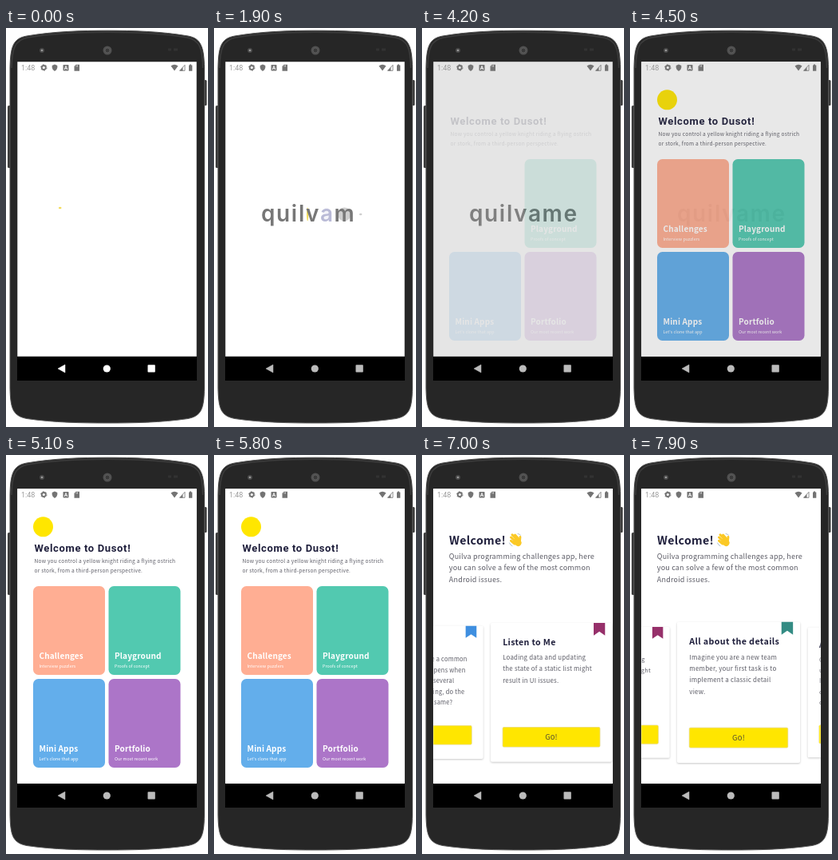
These frames come from a looping animation (253x499 px, 8 s). An HTML page:

```html
<!DOCTYPE html>
<html lang="en">
<head>
<meta charset="utf-8">
<title>App demo</title>
<style>
html, body { margin: 0; width: 100%; height: 100%; overflow: hidden; background: #fff; }
svg { display: block; width: 100%; height: 100%; }
text { font-family: 'Noto Sans CJK JP', 'Noto Sans CJK SC', 'Noto Sans CJK', 'Noto Sans', sans-serif; }
.rob { font-family: Roboto, sans-serif; }
.logo { font: 600 28px Inter, sans-serif; text-anchor: middle; }
.card { filter: drop-shadow(0 1px 1.2px rgba(0,0,0,.22)); }
.btn { filter: drop-shadow(0 .6px .8px rgba(0,0,0,.2)); }
</style>
</head>
<body>
<svg viewBox="0 0 253 499" id="stage">
  <defs>
    <clipPath id="screen"><rect x="14.3" y="42.3" width="224.4" height="368.5"/></clipPath>
  </defs>
  <rect x="2" y="97" width="4" height="78" rx="1.5" fill="#3c3c3c"/>
  <rect x="248" y="65" width="3.5" height="32" rx="1.5" fill="#3c3c3c"/>
  <path d="M5 50C5.500 24 8.500 13 26 10C60 4.200 95 3.200 127 3.200S194 4.200 228 10C244.500 13 248 24 248.500 50V450C248 476 245 485 228 488.500C194 493.500 159 494 127 494S60 493.500 26 488.500C8.500 485 5.500 476 5 450Z" fill="#262626" stroke="#555" stroke-width="1"/>
  <path d="M7 50C7.500 26 11 15 27 12C60 6.200 95 5.200 127 5.200S194 6.200 227 12C243 15 246 26 246.500 50" fill="none" stroke="#3c3c3c" stroke-width="1.500"/>
  <circle cx="45" cy="28" r="3" fill="#4a4a4a"/><circle cx="45" cy="28" r="1.300" fill="#999"/>
  <circle cx="127" cy="28" r="5.500" fill="#505050"/><circle cx="127" cy="28" r="3" fill="#3a3a3a" stroke="#666" stroke-width=".7"/>
  <path d="M203 27h4m3 0h5" stroke="#323232" stroke-width="3"/>
  <rect x="14" y="411" width="225" height="30"/>
  <g id="nav">
    <path d="M65 426L74 421V431Z" stroke-width=".5" stroke-linejoin="round"/>
    <circle cx="126.300" cy="426" r="4.600"/>
    <rect x="177.500" y="421.300" width="9.300" height="9.300" rx=".8"/>
  </g>
  <g clip-path="url(#screen)">
    <rect x="14" y="42" width="225" height="369" fill="#fff"/>
    <g id="splash"></g>
    <g id="home"></g>
    <rect id="dim" x="14" y="42" width="225" height="369"/>
    <g id="tasks"></g>
  </g>
  <g fill="#737373">
    <text class="rob" x="19" y="53" font-size="9" fill="#999">1:48</text>
    <circle cx="47.300" cy="49.500" r="2.500" fill="none" stroke="#737373" stroke-width="1.800"/>
    <circle cx="47.300" cy="49.500" r="3.700" fill="none" stroke="#737373" stroke-width="1" stroke-dasharray="1.900 1.970"/>
    <path d="M61 45.500L64.300 47V49.500Q64 52.500 61 54Q58 52.500 57.700 49.500V47Z"/>
    <rect x="71.500" y="46" width="7" height="7.500" rx=".8"/>
    <path d="M73.200 52L75 47.500L76.800 52M74 50.600h2" fill="none" stroke="#fff" stroke-width=".9"/>
    <path d="M87.500 45.700H92V53.800H85.500V48Z"/>
    <path d="M88 46.500v2m1.500 -2v2" stroke="#fff" stroke-width=".6"/>
    <path d="M206.500 47.500Q211 43.800 215.500 47.500L211 53.500Z"/>
    <path d="M217.500 53.300L224 46.300V53.300Z" fill="none" stroke="#737373" stroke-width=".8"/>
    <path d="M217.500 53.500L221.500 49V53.500Z"/>
    <path d="M229 46.500h1v-1h2v1h1.300v7.300h-4.300Z"/>
  </g>
</svg>
<script>
const $ = id => document.getElementById(id);
const INK = '#1f1f3c', SOFT = '#5c5c66', YELLOW = '#ffe600', GRAY = '#777';
const clamp = v => Math.max(0, Math.min(1, v));

// piecewise linear track of [time, value] pairs
function track(keys, t) {
  if (t <= keys[0][0]) return keys[0][1];
  for (let i = 1; i < keys.length; i++) {
    const [a, u] = keys[i - 1], [b, v] = keys[i];
    if (t <= b) return u + (v - u) * (t - a) / (b - a);
  }
  return keys[keys.length - 1][1];
}

const txt = (x, y, size, s, spacing = 0, fill = SOFT, more = '') =>
  `<text x="${x}" y="${y}" font-size="${size}" letter-spacing="${spacing}" fill="${fill}" ${more}>${s}</text>`;
const BOLD = 'font-weight="700"';
const lines = (x, y, step, size, spacing, list) =>
  list.map((s, i) => txt(x, y + i * step, size, s, spacing)).join('');

// splash word
const word = [...'quilvame'];
const mid = [67.7, 86.5, 100.5, 109.7, 123.2, 141, 163.2, 185.7];
$('splash').innerHTML = word.map((c, i) =>
  `<ellipse fill="${i % 4 ? (i === 5 ? '#f4f4f9' : '#cfcfcf') : '#f3dc5a'}"/>` +
  `<text class="logo" x="${mid[i]}" y="242">${c}</text>`).join('');
const blobs = $('splash').querySelectorAll('ellipse');
const letters = $('splash').querySelectorAll('text');

// home screen
const tile = (x, y, color, title, sub) =>
  `<g><rect x="${x}" y="${y}" width="90" height="111" rx="6.500" fill="${color}"/>` +
  txt(x + 7.5, y + 90.5, 10, title, .15, '#fff', BOLD) +
  txt(x + 7.5, y + 101.8, 5.4, sub, 0, '#fff') + '</g>';
$('home').innerHTML =
  `<rect x="14" y="42" width="225" height="369" fill="#fff"/>
  <g id="late"><circle cx="46.500" cy="89.800" r="12.500" fill="${YELLOW}"/>` +
  tile(34, 164, '#ffae93', 'Challenges', 'Interview puzzlers') + '</g>' +
  txt(35.5, 121.3, 13, 'Welcome to Dusot!', .65, INK, BOLD + ' class="rob"') +
  lines(35.5, 135.3, 12, 6.6, .23, [
    'Now you control a yellow knight riding a flying ostrich',
    'or stork, from a third-person perspective.']) +
  tile(128.5, 164, '#52c9b0', 'Playground', 'Proofs of concept') +
  tile(34, 280, '#63aeeb', 'Mini Apps', "Let's clone that app") +
  tile(128.5, 280, '#ac75c8', 'Portfolio', 'Our most recent work');

// challenges screen, cards drawn around their own centre
const card = (color, title, body) =>
  `<g><rect class="card" x="-77.500" y="-88" width="155" height="177" rx="2" fill="#fff"/>
  <path d="M54 -88H68.500V-72L61.250 -77L54 -72Z" fill="${color}"/>` +
  txt(-62, -59.8, 10.8, title, .35, INK, BOLD) +
  lines(-62, -41, 14.5, 8, .24, body) +
  `<rect class="btn" x="-62" y="45" width="124" height="25" rx="1.500" fill="${YELLOW}" stroke="#f3e27a" stroke-width=".6"/>` +
  txt(0, 60.6, 9.5, 'Go!', .2, '#574f30', 'text-anchor="middle"') + '</g>';
$('tasks').innerHTML =
  '<rect x="14" y="42" width="225" height="369" fill="#fff"/>' +
  txt(34, 111.5, 14.1, 'Welcome!', .35, INK, BOLD) +
  `<g fill="none" stroke="#fbc926" stroke-linecap="round" stroke-width="3">
    <path d="M118 109L111.500 103M119 106L113 99.800M121 105L116.500 100M116 111L111.500 107.300"/>
    <path d="M122.500 108L123 102.500" stroke-width="2.800"/>
    <path d="M118.500 108.500L120.500 110" stroke-width="8"/>
    <path d="M109.500 110Q110.500 113 113 113.800M120 98.500Q122.500 98.800 123.500 100.200" stroke="#8fa9b8" stroke-width=".7"/>
  </g>` +
  lines(33.8, 129.6, 14.8, 9.05, .17, [
    'Quilva programming challenges app, here',
    'you can solve a few of the most common',
    'Android issues.']) +
  '<g id="deck">' +
  card('#3f8fe0', 'Step Back', ['Going back may be a common', 'task, but what happens when',
    'the user opens up several', 'screens while moving, do the', 'results remain the same?']) +
  card('#96306a', 'Listen to Me', ['Loading data and updating',
    'the state of a static list might', 'result in UI issues.']) +
  card('#348c84', 'All about the details', ['Imagine you are a new team',
    'member, your first task is to', 'implement a classic detail', 'view.']) +
  card('#e08a3c', 'Async Results', ['Calls to a remote server', 'under slow networks.',
    'In that case a long wait', 'could block the app, so', 'do it with care.']) + '</g>';
const cards = [...$('deck').children];

const FADE = [[4000, 0], [4100, .06], [4200, .17], [4300, .45], [4400, .76], [4500, .95], [4600, 1]];
const DIM = [[4000, 0], [4200, .1], [4500, .09], [4900, 0]];
const SCROLL = [[6700, 126], [6800, 100], [6900, 50], [7000, 4], [7100, -20], [7250, -32],
  [7600, -32], [7700, -70], [7800, -140], [7900, -180], [8000, -190]];

function drawLetter(i, t) {
  const p = (t - i * 250) / 1000;
  const grow = clamp((p - .15) / .25), shrink = clamp((p - .4) / .58);
  const blob = blobs[i], set = (k, v) => blob.setAttribute(k, v);
  set('cx', mid[i] - (i % 4 ? 2 * (1 - grow) : 7 * shrink));
  set('cy', 225 + 8 * clamp(p / .15));
  set('rx', p < 0 || p >= 1 ? 0 : (1.8 + 6.5 * grow) * (1 - shrink));
  set('ry', 1.2 + 7.3 * grow);
  letters[i].setAttribute('opacity', clamp((p - .2) / .2));
  const k = i === 5 ? clamp((p - .65) / .35) : 1;
  const mix = (a, b) => Math.round(a + (b - a) * k);
  letters[i].setAttribute('fill', k === 1 ? GRAY : `rgb(${mix(185, 119)},${mix(186, 119)},${mix(214, 119)})`);
}

function draw(t) {
  const tone = Math.round(255 - 68 * clamp(t / 900));
  const gray = `rgb(${tone},${tone},${tone})`;
  $('nav').setAttribute('fill', gray);
  $('nav').setAttribute('stroke', gray);
  $('nav').setAttribute('stroke-width', 0);
  word.forEach((c, i) => drawLetter(i, t));
  $('home').setAttribute('opacity', track(FADE, t));
  $('late').setAttribute('opacity', t > 4250 ? 1 : 0);
  $('dim').setAttribute('opacity', track(DIM, t));

  const enter = clamp((t - 5800) / 300);
  $('tasks').setAttribute('opacity', enter);
  $('tasks').setAttribute('transform', `translate(0 ${20 * (1 - enter) ** 2})`);
  const first = track(SCROLL, t);
  cards.forEach((el, i) => {
    const x = first + 158 * i;
    const scale = 1 - .08 * Math.min(1, Math.abs(x - 126) / 158);
    el.setAttribute('transform', `translate(${x} 296.4) scale(${scale})`);
  });
}

const start = performance.now();
function tick() {
  const t = (performance.now() - start) % 8000;
  draw(Math.floor(t / 100) * 100); // ten pictures a second
  requestAnimationFrame(tick);
}
tick();
</script>
</body>
</html>
```
